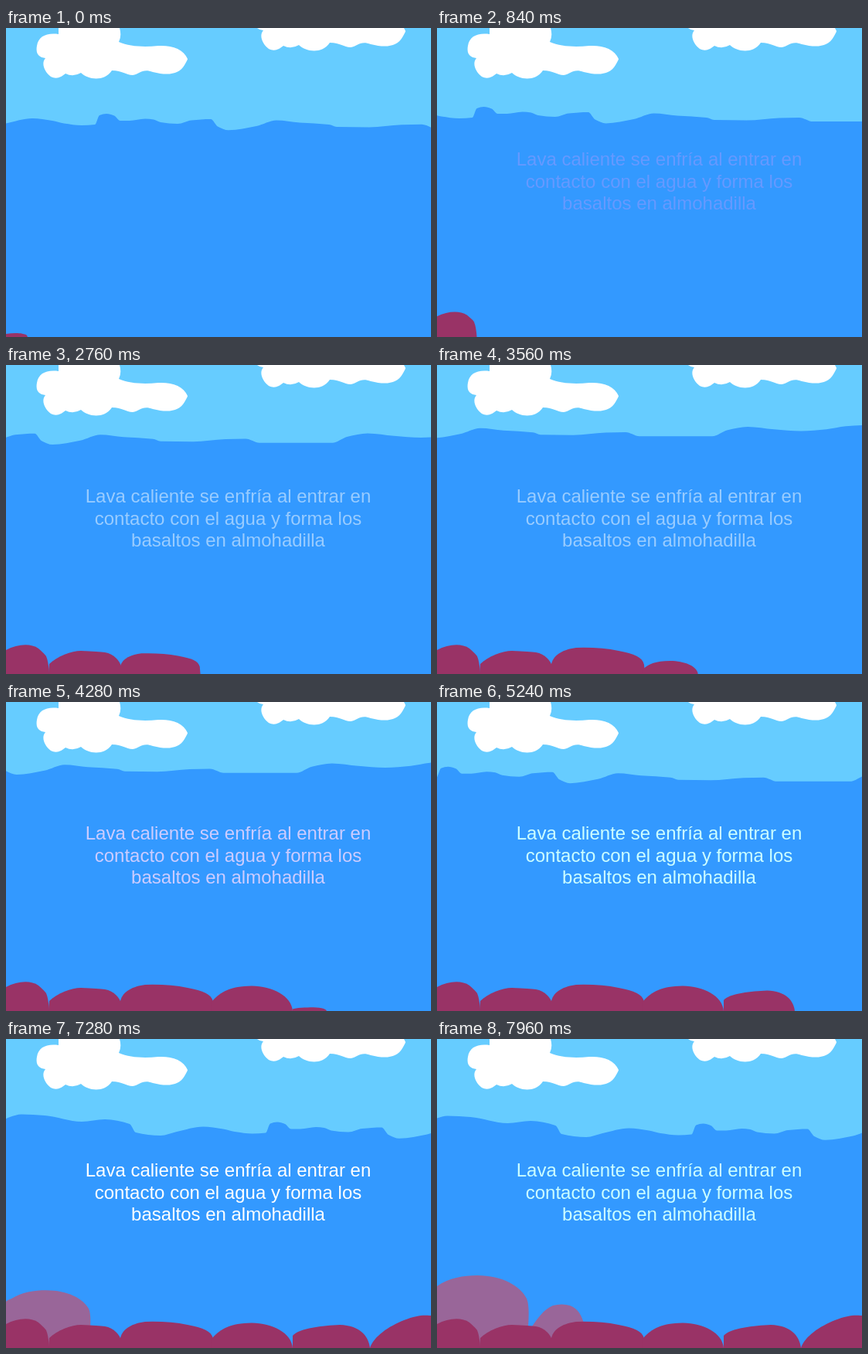
Write an HTML page with a canvas that moves like this. It is 550 px wide and 400 px high and loops after 8000 ms.

```html
<!DOCTYPE html>
<html lang="es">
<head>
<meta charset="utf-8">
<title>Basaltos en almohadilla</title>
<style>
  html, body { margin: 0; width: 100%; height: 100%; overflow: hidden; background: #6cf; }
  canvas { display: block; }
</style>
</head>
<body>
<canvas id="stage" width="550" height="400"></canvas>
<script>
const ctx = document.getElementById('stage').getContext('2d');
const LOOP = 8000, STEP = 40;

const cloud = new Path2D(`M68 -10V8C52 6 42 11 40 23C38 34 43 38 51 39C45 46 50 57 58 63
  C66 67 72 63 77 59Q87 64 97 58C105 66 126 71 137 55C151 55 155 61 164 61
  C173 60 176 52 190 57C210 62 224 60 231 48Q235 41 235 40C230 27 214 22 197 23
  C178 25 160 24 146 18Q150 10 147 0V-10Z`);

// Crest line of the water, wider than the stage because it slides sideways.
const crest = [
  [-270, 120], [-230, 111], [-216, 104.5], [-201, 101], [-171, 102.5], [-123, 110.5], [-93, 107.5],
  [-61, 113.5], [-53, 124.5], [-21, 128.5], [0, 123.5], [34, 117], [60, 120], [75, 123.5], [98, 126],
  [115, 125], [121, 113], [130, 111], [140, 113.5], [148, 120], [160, 120], [180, 117.5], [191, 118.5],
  [200, 122], [222, 124], [240, 119.5], [265, 118], [274, 127.5], [288, 132.3], [324, 127], [350, 119.5],
  [380, 122.5], [418, 125], [428, 128], [470, 128.5], [512, 125.3], [538, 124.8], [556, 130],
  [650, 130], [670, 122], [696, 117.7], [730, 121], [765, 123.3], [798, 121], [823, 117], [850, 115.7], [890, 117]
];

const lava = (color, anchor, start, end, width, height, d) =>
  ({ color, anchor, start, end, width, height, shape: new Path2D(d) });
const DARK = '#936', PALE = '#969';

// Pillows in drawing order; width and height are the scales at birth.
const pillows = [
  lava(PALE, 50, 6600, 7480, .4, .1, 'M-40 400C-35 345 -12 324 0 320C15 309 35 306 52 306C85 306 108 320 116 336Q120 345 118 372L116 400Z'),
  lava(PALE, 120, 7480, 7960, .6, .18, 'M115 400L123 372C130 362 138 350 150 345Q162 342 172 345C183 349 187 358 190 368L198 400Z'),
  lava(DARK, 0, 0, 1000, .5, .13, 'M0 400V369C15 361 32 360 42 367Q50 374 52 377Q55 384 56 400Z'),
  lava(DARK, 56, 1000, 2000, .45, .1, 'M55 400L56 387C66 377 85 370 97 370Q120 371 128 372C140 374 147 383 149 390L150 400Z'),
  lava(DARK, 148, 2000, 3000, .4, .1, 'M147 400L148 387C151 374 165 368 180 366Q210 365 235 370C255 374 266 378 268 388L269 400Z'),
  lava(DARK, 267, 3000, 4200, .4, .1, 'M266 400L267 387C278 375 290 368 318 367.5C345 368 369 380 371 400Z'),
  lava(DARK, 371, 4200, 5400, .4, .1, 'M371 400V384C380 374 410 371 432 370C458 371 469 384 471 400Z'),
  lava(DARK, 471, 5400, 6560, .4, .1, 'M471 400C476 385 495 372 515 364C530 358 540 357 548 358C560 358 575 366 580 376L590 400Z')
];

const caption = [
  ['Lava caliente se enfría al entrar en', 178],
  ['contacto con el agua y forma los', 207],
  ['basaltos en almohadilla', 235]
];

const drift = [[0, 0], [3960, -327], [7480, 254], [8000, 211]];
const tide = [[0, 0], [3960, -42], [7480, -1.2], [8000, -1.6]];
const captionAlpha = [[0, 0], [6000, 1], [7480, 1], [8000, .79]];

const mix = (a, b, u) => a + (b - a) * u;

function tween(keys, t) {
  const i = keys.findIndex(([time]) => time > t);
  const [t0, v0] = keys[i - 1], [t1, v1] = keys[i];
  return mix(v0, v1, (t - t0) / (t1 - t0));
}

// Monotone cubic through the points, so crests never overshoot.
function smoothWater(points) {
  const steep = points.slice(1).map(([x, y], i) => (y - points[i][1]) / (x - points[i][0]));
  const slopes = points.map((_, i) => {
    const a = steep[i - 1], b = steep[i];
    return a * b > 0 ? 2 * a * b / (a + b) : 0;
  });
  const path = new Path2D();
  path.moveTo(...points[0]);
  for (let i = 1; i < points.length; i++) {
    const [x0, y0] = points[i - 1], [x1, y1] = points[i], third = (x1 - x0) / 3;
    path.bezierCurveTo(x0 + third, y0 + slopes[i - 1] * third, x1 - third, y1 - slopes[i] * third, x1, y1);
  }
  path.lineTo(points[points.length - 1][0], 500);
  path.lineTo(points[0][0], 500);
  path.closePath();
  return path;
}
const water = smoothWater(crest);

function fillAt(shape, color, x, y) {
  ctx.save();
  ctx.translate(x, y);
  ctx.fillStyle = color;
  ctx.fill(shape);
  ctx.restore();
}

function drawPillow(p, t) {
  if (t < p.start) return;
  const u = Math.min(1, (t - p.start) / (p.end - p.start));
  ctx.save();
  ctx.translate(p.anchor, 400);
  ctx.scale(mix(p.width, 1, u), mix(p.height, 1, u));
  ctx.translate(-p.anchor, -400);
  ctx.fillStyle = p.color;
  ctx.fill(p.shape);
  ctx.restore();
}

function drawCaption(alpha) {
  if (alpha < .125) return;
  // The fade runs through web-safe colours.
  const channel = from => 51 * Math.round(mix(from, 255, alpha) / 51);
  ctx.fillStyle = `rgb(${channel(51)}, ${channel(153)}, 255)`;
  ctx.font = '24px "Liberation Sans", Arial, sans-serif';
  ctx.textAlign = 'center';
  for (const [line, y] of caption) ctx.fillText(line, 287.5, y);
}

function draw(t) {
  ctx.fillStyle = '#6cf';
  ctx.fillRect(0, 0, 550, 400);
  fillAt(cloud, '#fff', 0, 0);
  fillAt(cloud, '#fff', 282, -36);
  fillAt(water, '#39f', tween(drift, t), tween(tide, t));
  for (const p of pillows) drawPillow(p, t);
  drawCaption(tween(captionAlpha, t));
}

let origin;
function tick(now) {
  origin ??= now;
  draw(Math.floor((now - origin) % LOOP / STEP) * STEP);
  requestAnimationFrame(tick);
}
draw(0);
requestAnimationFrame(tick);
</script>
</body>
</html>
```
